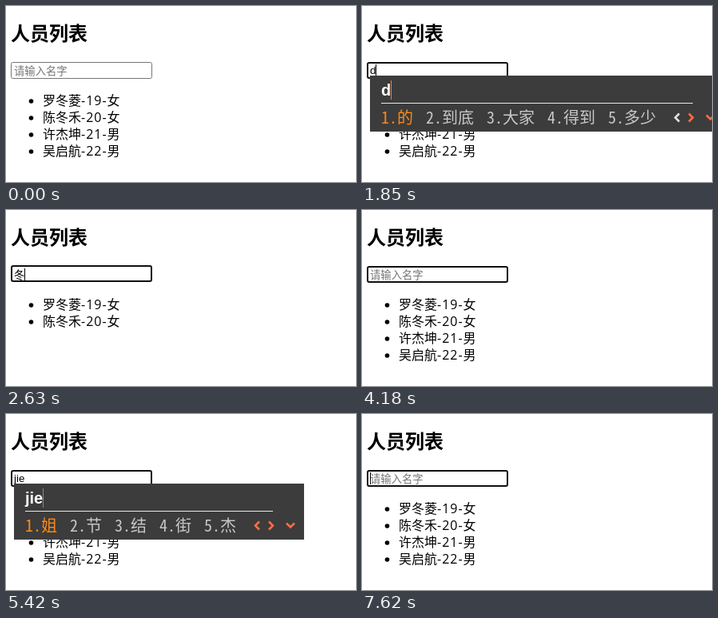
An HTML page that plays this animation: 438 by 220 pixels, repeating every 8 s.

```html
<!DOCTYPE html>
<html lang="zh-CN">
<head>
<meta charset="utf-8">
<style>
html, body { margin: 0; width: 100%; height: 100%; overflow: hidden; background: #fff; }
svg { display: block; width: 438px; height: 220px; font: 16px "Noto Sans CJK SC", "Noto Sans CJK", sans-serif; }
.latin { font-family: "Open Sans", "Noto Sans", sans-serif; letter-spacing: 1px; }
.field { font: 13.333px "Liberation Sans", "Noto Sans CJK SC", "Noto Sans CJK", sans-serif; }
.typed { font: bold 20px "Liberation Sans", sans-serif; fill: #fff; }
.pick { font: 20px "Noto Sans Mono CJK SC", "Noto Sans CJK SC", "Noto Sans CJK", monospace; }
.arrow { fill: none; stroke-width: 2.5; }
</style>
</head>
<body>
<svg id="stage" viewBox="0 0 438 220"></svg>
<script>
const LOOP = 8000;
const stage = document.getElementById('stage');
const people = [['罗冬菱', 19, '女'], ['陈冬禾', 20, '女'], ['许杰坤', 21, '男'], ['吴启航', 22, '男']];

// Each step changes only the listed parts of the state.
const steps = [
  [0, { border: 'idle', typing: '', query: '', caret: 0, picks: '', paged: 0, glow: 1 }],
  [380, { border: 'hover' }],
  [760, { border: 'focus', caret: 1 }],
  [1300, { caret: 0 }],
  [1850, { typing: 'd', caret: 1, picks: '的 到底 大家 得到 多少' }],
  [1930, { typing: 'do', picks: '都 多 读 度 对' }],
  [2010, { typing: 'don', picks: '动 懂 东 冬 洞' }],
  [2160, { typing: 'dong', picks: '冬 动 懂 东 dongle' }],
  [2550, { query: '冬' }],
  [2630, { typing: '', picks: '' }],
  [3180, { caret: 0 }],
  [3640, { caret: 1 }],
  [3790, { query: '' }],
  [4180, { caret: 0 }],
  [4720, { typing: 'j', caret: 1, picks: '就 将 叫 见 觉得' }],
  [4800, { typing: 'ji', picks: '几 级 及 记 机' }],
  [4880, { typing: 'jie', picks: '接 解 界 借 结果' }],
  [5270, { caret: 0 }],
  [5350, { picks: '姐 节 结 街 杰', paged: 1 }],
  [5420, { glow: 0 }],
  [5890, { caret: 1, glow: .2 }],
  [5970, { glow: .4 }],
  [6050, { glow: .6 }],
  [6130, { glow: .8 }],
  [6210, { glow: 1 }],
  [6450, { caret: 0 }],
  [6600, { typing: '', picks: '', query: '杰', caret: 1 }],
  [7070, { caret: 0 }],
  [7620, { query: '', caret: 1 }]
];

const text = (x, y, str, attrs = '') => `<text x="${x}" y="${y}" ${attrs}>${str}</text>`;
const rect = (x, y, w, h, attrs) => `<rect x="${x}" y="${y}" width="${w}" height="${h}" ${attrs}/>`;

const pen = document.createElement('canvas').getContext('2d');
function measure(str, font) {
  pen.font = font;
  return pen.measureText(str).width;
}

function field(s) {
  const value = s.query || s.typing;
  const top = s.query ? 69 : 70;
  const box = s.border === 'focus'
    ? rect(7, top + 1, 175, 19, 'rx="2" fill="#fff" stroke="#101010" stroke-width="2"')
    : rect(6.5, top + .5, 176, 20, `rx="2" fill="#fff" stroke="${s.border === 'hover' ? '#4f4f4f' : '#767676'}"`);
  const width = s.query ? 13 : measure(value, '13.333px "Liberation Sans", sans-serif');
  return box
    + text(10, value && !s.query ? 85 : 85.5, value || '请输入名字', `class="field" fill="${value ? '#000' : '#757575'}"`)
    + (s.caret ? rect(10 + Math.floor(width), 73, 1, 15, '') : '');
}

function list(query) {
  return people.filter(p => p[0].includes(query)).map(([name, age, sex], i) => {
    const y = 124 + 21 * i;
    return `<circle cx="31.5" cy="${y - 5}" r="2.8"/>`
      + text(46, y, `${name}<tspan class="latin">-${age}-</tspan>${sex}`);
  }).join('');
}

function panel(s) {
  if (!s.picks) return '';
  let x = 24;
  const picks = s.picks.split(' ').map((word, i) => {
    const item = text(x, 146.5, `${i + 1}.${word}`, `class="pick" fill="${i ? '#c8c8c8' : '#ff8a14'}"`);
    x += 36 + word.length * (/[a-z]/.test(word) ? 10 : 20);
    return item;
  }).join('');
  const right = x + 69;
  const arrow = (d, color) => `<path class="arrow" d="${d}" stroke="${color}"/>`;
  const end = 24 + Math.floor(measure(s.typing, 'bold 20px "Liberation Sans", sans-serif'));
  return rect(10, 87, right - 10, 70, 'fill="#3c3c3c"')
    + text(24, 112, s.typing, 'class="typed"')
    + rect(end, 93, 1, 24, 'fill="#888"')
    + rect(end, 93, 1, 24, `fill="#ff7f1a" opacity="${s.glow}"`)
    + rect(24, 121, right - 63, 1, 'fill="#e8e8e8"')
    + picks
    + arrow(`M${right - 56} 134.5l-5 5 5 5`, s.paged ? '#ff6e45' : '#e0e0e0')
    + arrow(`M${right - 44} 134.5l5 5-5 5`, '#ff6e45')
    + arrow(`M${right - 22} 136.5l5 5 5-5`, '#ff6e45');
}

function draw(index) {
  const s = Object.assign({}, ...steps.slice(0, index + 1).map(step => step[1]));
  stage.innerHTML = text(6, 43, '人员列表', 'font-size="24" font-weight="700"')
    + field(s) + list(s.query) + panel(s);
}

const start = performance.now();
let shown = -1;
function tick() {
  const t = (performance.now() - start) % LOOP;
  const index = steps.findLastIndex(step => step[0] <= t);
  if (index !== shown) draw(shown = index);
  requestAnimationFrame(tick);
}
tick();
</script>
</body>
</html>
```
